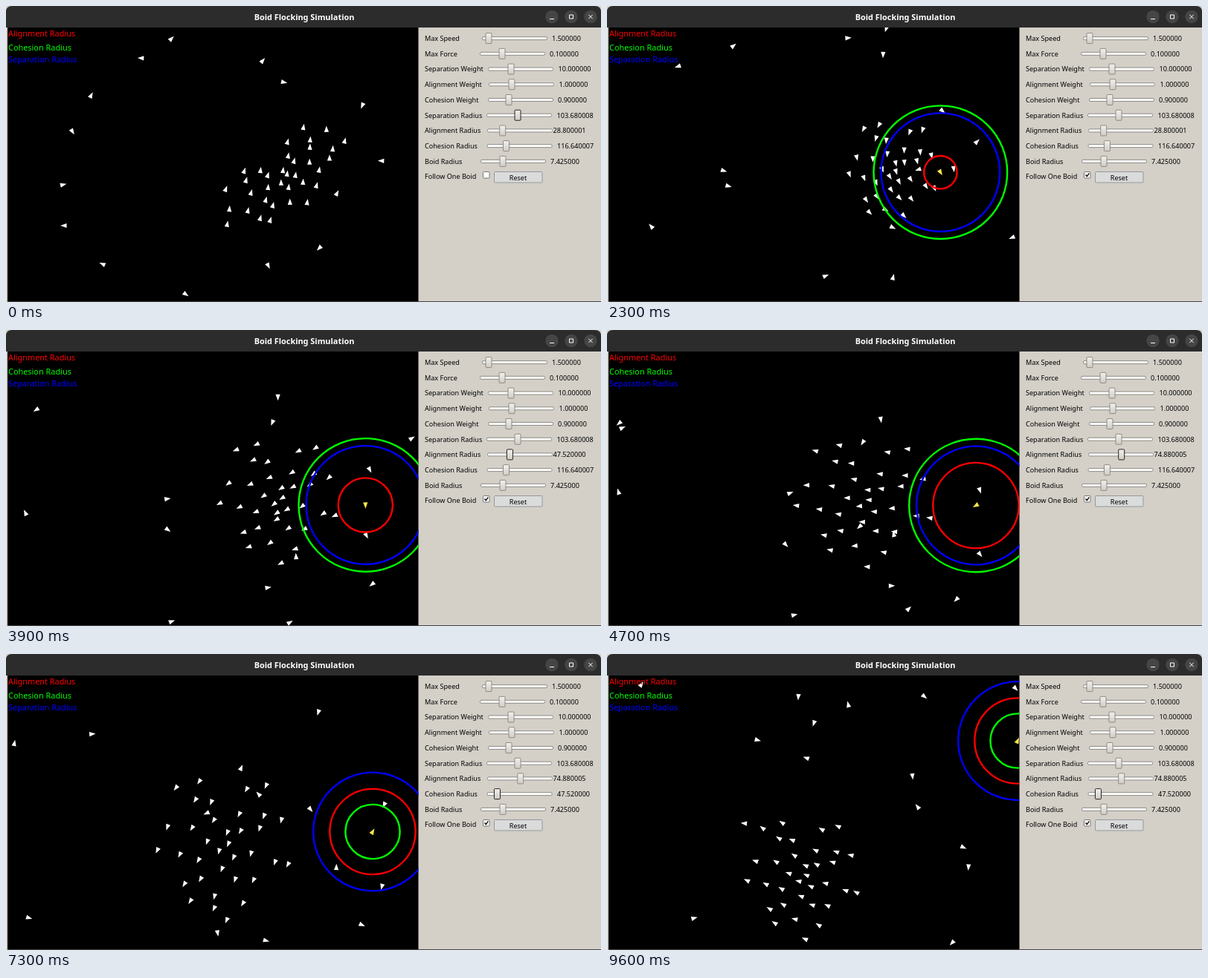
Animation of 800 by 399 pixels, one loop 9.7 s. Source, as an HTML page:

```html
<!DOCTYPE html>
<html>
<head>
<meta charset="utf-8">
<title>Boid Flocking Simulation</title>
<style>
html, body { margin: 0; width: 100%; height: 100%; overflow: hidden; background: #d4d0c8; }
svg { display: block; width: 800px; height: 399px; }
text { font-family: "Noto Sans", sans-serif; font-size: 9.1px; fill: #000; }
.title { font-size: 10.9px; font-weight: 700; fill: #fff; text-anchor: middle; }
.legend text { font-size: 10.9px; }
</style>
</head>
<body>
<svg viewBox="0 0 800 399">
  <defs>
    <clipPath id="view"><rect x="2" y="29" width="552.5" height="369"/></clipPath>
    <linearGradient id="face" x2="0" y2="1">
      <stop offset="0" stop-color="#f2f1ee"/><stop offset="1" stop-color="#cfccc5"/>
    </linearGradient>
  </defs>
  <path d="M0 29V8Q0 0 8 0H792Q800 0 800 8V29Z" fill="#2c2c2c"/>
  <text class="title" x="401" y="19">Boid Flocking Simulation</text>
  <g fill="#454545">
    <circle cx="734" cy="14.5" r="8.7"/><circle cx="760" cy="14.5" r="8.7"/><circle cx="786" cy="14.5" r="8.7"/>
  </g>
  <path d="M731 17.5H737M757.5 12H762.5V17H757.5ZM783.3 11.8L788.7 17.2M788.7 11.8L783.3 17.2" fill="none" stroke="#fff"/>
  <rect x="2" y="29" width="552.5" height="369" fill="#000"/>
  <path d="M2 398.5H800" stroke="#444"/>
  <g clip-path="url(#view)">
    <path id="boids" fill="#fff"/>
    <g id="rings" fill="none" stroke-width="2.4">
      <circle stroke="#0f0"/><circle stroke="#00f"/><circle stroke="#f00"/>
    </g>
    <path id="leader"/>
    <g class="legend">
      <text x="3" y="41.2" style="fill:#f00">Alignment Radius</text>
      <text x="3" y="59.5" style="fill:#0f0">Cohesion Radius</text>
      <text x="3" y="76" style="fill:#00f">Separation Radius</text>
    </g>
  </g>
  <g id="panel">
    <text x="563" y="233.2">Follow One Boid</text>
    <rect x="641.5" y="223.5" width="8.5" height="8.5" rx="1" fill="#fff" stroke="#777"/>
    <path id="tick" d="M643.5 227.5L645.3 229.7L648.3 225.3" fill="none" stroke="#000" stroke-width="1.3"/>
    <rect x="656.5" y="223.5" width="64.5" height="14.5" rx="1" fill="#dadbdb" stroke="#96989b"/>
    <text x="688.5" y="234.6" text-anchor="middle">Reset</text>
  </g>
</svg>
<script>
const LOOP = 9700, STEP = 100, LEFT = 2, TOP = 29, W = 552, H = 369;
const FOLLOW_AT = 700, ZOOM = 0.77, DEG = Math.PI / 180, TURN = 2 * Math.PI;
const GOLDEN = Math.PI * (3 - Math.sqrt(5));
const $ = id => document.getElementById(id);

function add(parent, tag, attrs, text = '') {
  const el = document.createElementNS('http://www.w3.org/2000/svg', tag);
  for (const k in attrs) el.setAttribute(k, attrs[k]);
  el.textContent = text;
  return parent.appendChild(el);
}

let seed = 11;
function rnd(a, b) {
  seed = (seed * 16807) % 2147483647;
  return a + (b - a) * seed / 2147483647;
}

// Flock as an ellipse: time, centre, half axes, tilt, heading, heading change from middle to edge
const FLOCK = [
  [0, 374, 230, 108, 48, -38, -80, 0],
  [1400, 383, 224, 65, 65, 0, 30, -90],
  [3100, 382, 225, 72, 86, 0, 105, 0],
  [4700, 347, 230, 100, 92, 0, 185, 0],
  [6100, 312, 232, 98, 95, 0, 163, 0],
  [7300, 294, 257, 98, 105, 0, 115, 0],
  [9600, 264, 299, 82, 88, 0, 205, 0]
];

// Followed boid: time, place, heading
const LEAD = [
  [0, 435, 205, -90], [1400, 436.5, 212, 85], [3100, 462.5, 234, 30], [4700, 496, 236.5, 150],
  [6100, 455.5, 245.5, 110], [7300, 493, 239.5, -60], [9600, 552, 117, -65]
];

// Smooth cubic through the key rows, all columns at once
function track(keys, t) {
  const last = keys.length - 1;
  let k = 0;
  while (k < last - 1 && t >= keys[k + 1][0]) k++;
  const span = keys[k + 1][0] - keys[k][0], u = (t - keys[k][0]) / span;
  const slope = (n, c) => {
    const p = keys[Math.max(n - 1, 0)], q = keys[Math.min(n + 1, last)];
    return (q[c] - p[c]) / (q[0] - p[0]) * span;
  };
  return keys[k].slice(1).map((a, i) => {
    const b = keys[k + 1][i + 1], m = slope(k, i + 1), n = slope(k + 1, i + 1);
    return a + u * (m + u * (3 * (b - a) - 2 * m - n + u * (2 * (a - b) + m + n)));
  });
}

// Members fill the unit disc in a sunflower pattern, denser in the middle
const members = Array.from({ length: 34 }, (_, i) => {
  const r = ((i + .5) / 34) ** .7, a = i * GOLDEN + rnd(-.2, .2);
  return { u: r * Math.cos(a), v: r * Math.sin(a), lean: rnd(-12, 12) };
});

// Strays start on a wide ring around the flock and fly in gentle curves
const strays = Array.from({ length: 15 }, (_, i) => {
  const a = (i + rnd(-.3, .3)) / 15 * TURN, r = rnd(.8, 1.1);
  return {
    x: 270 + 225 * r * Math.cos(a), y: 212 + 165 * r * Math.sin(a),
    h: rnd(0, TURN), turn: rnd(.12, .3) * (i % 2 ? 1 : -1)
  };
});

const wrap = (v, from, size) => ((v - from) % size + size) % size + from;

function memberPose(m, [cx, cy, long, short, tilt, heading, twist]) {
  const c = Math.cos(tilt * DEG), s = Math.sin(tilt * DEG), p = m.u * long, q = m.v * short;
  return { x: cx + p * c - q * s, y: cy + p * s + q * c, a: (heading + twist * m.v + m.lean) * DEG };
}

function strayPose({ x, y, h, turn }, sec) {
  const a = h + turn * sec, bend = 38 / turn;
  return {
    x: wrap(x + bend * (Math.sin(a) - Math.sin(h)), LEFT, W),
    y: wrap(y - bend * (Math.cos(a) - Math.cos(h)), TOP, H), a
  };
}

function arrow({ x, y, a }) {
  const c = Math.cos(a), s = Math.sin(a);
  const at = (f, r) => (x + f * c - r * s).toFixed(2) + ' ' + (y + f * s + r * c).toFixed(2);
  return `M${at(4.8, 0)}L${at(-3.6, 3.1)}L${at(-3.6, -3.1)}Z`;
}

// Label, track start, knob centre, value start, value
const sliders = [
  ['Max Speed', 640, 649, 734, '1.500000'],
  ['Max Force', 637, 667, 731, '0.100000'],
  ['Separation Weight', 648, 679, 742.5, '10.000000'],
  ['Alignment Weight', 649, 680, 743.5, '1.000000'],
  ['Cohesion Weight', 648, 676, 742, '0.900000'],
  ['Separation Radius', 646, 688, 740.5, '103.680008'],
  ['Alignment Radius', 647, 668, 735.5, ''],
  ['Cohesion Radius', 646.5, 672, 741, ''],
  ['Boid Radius', 638, 668, 732, '7.425000']
].map(([label, x, knobX, valueX, value], row) => {
  const y = 43.6 + 20.72 * row, g = $('panel');
  add(g, 'text', { x: 563, y: y + 3.4 }, label);
  add(g, 'rect', { x: x + .5, y: y - 2, width: 87, height: 4, rx: 1.5, fill: '#fff', stroke: '#8d8a84' });
  const knob = add(g, 'rect', { x: knobX - 4, y: y - 7, width: 8, height: 14, rx: 1, fill: 'url(#face)', stroke: '#8d8a84' });
  return { x, knob, text: add(g, 'text', { x: valueX, y: y + 3.4 }, value) };
});
const [sep, align, coh] = sliders.slice(5);

const ramp = (t, t0, t1) => Math.min(1, Math.max(0, (t - t0) / (t1 - t0)));
const focus = (s, on) => s.knob.setAttribute('stroke', on ? '#222' : '#8d8a84');

// Values step in single-precision notches
function setSlider(s, unit, notches) {
  const value = Math.fround(Math.fround(unit) * notches);
  s.text.textContent = value.toFixed(6);
  s.knob.setAttribute('x', s.x + 1.7 + .75 * notches);
  return value;
}

function draw(t) {
  const following = t >= FOLLOW_AT, shape = track(FLOCK, t);
  const [x, y, heading] = track(LEAD, t);
  const poses = members.map(m => memberPose(m, shape)).concat(strays.map(s => strayPose(s, t / 1000)));
  $('boids').setAttribute('d', poses.map(arrow).join(''));
  $('leader').setAttribute('d', arrow({ x, y, a: heading * DEG }));
  $('leader').setAttribute('fill', following ? '#ffe64a' : '#fff');

  const alignR = setSlider(align, 1.44, Math.round(20 + 32 * ramp(t, 3500, 4500)));
  const cohR = setSlider(coh, 4.32, Math.round(27 - 11 * ramp(t, 5100, 6100) - 5 * ramp(t, 6100, 6900)));
  focus(sep, !following);
  focus(align, t >= 3400 && t < 5000);
  focus(coh, t >= 5000);

  const show = following ? 'visible' : 'hidden';
  $('rings').setAttribute('visibility', show);
  $('tick').setAttribute('visibility', show);
  [cohR, 103.68, alignR].forEach((r, i) => {
    const ring = $('rings').children[i];
    ring.setAttribute('cx', x);
    ring.setAttribute('cy', y);
    ring.setAttribute('r', r * ZOOM);
  });
}

const start = performance.now();
function tick(now) {
  const t = Math.max(0, now - start) % LOOP;
  draw(Math.floor(t / STEP) * STEP);
  requestAnimationFrame(tick);
}
draw(0);
requestAnimationFrame(tick);
</script>
</body>
</html>
```
